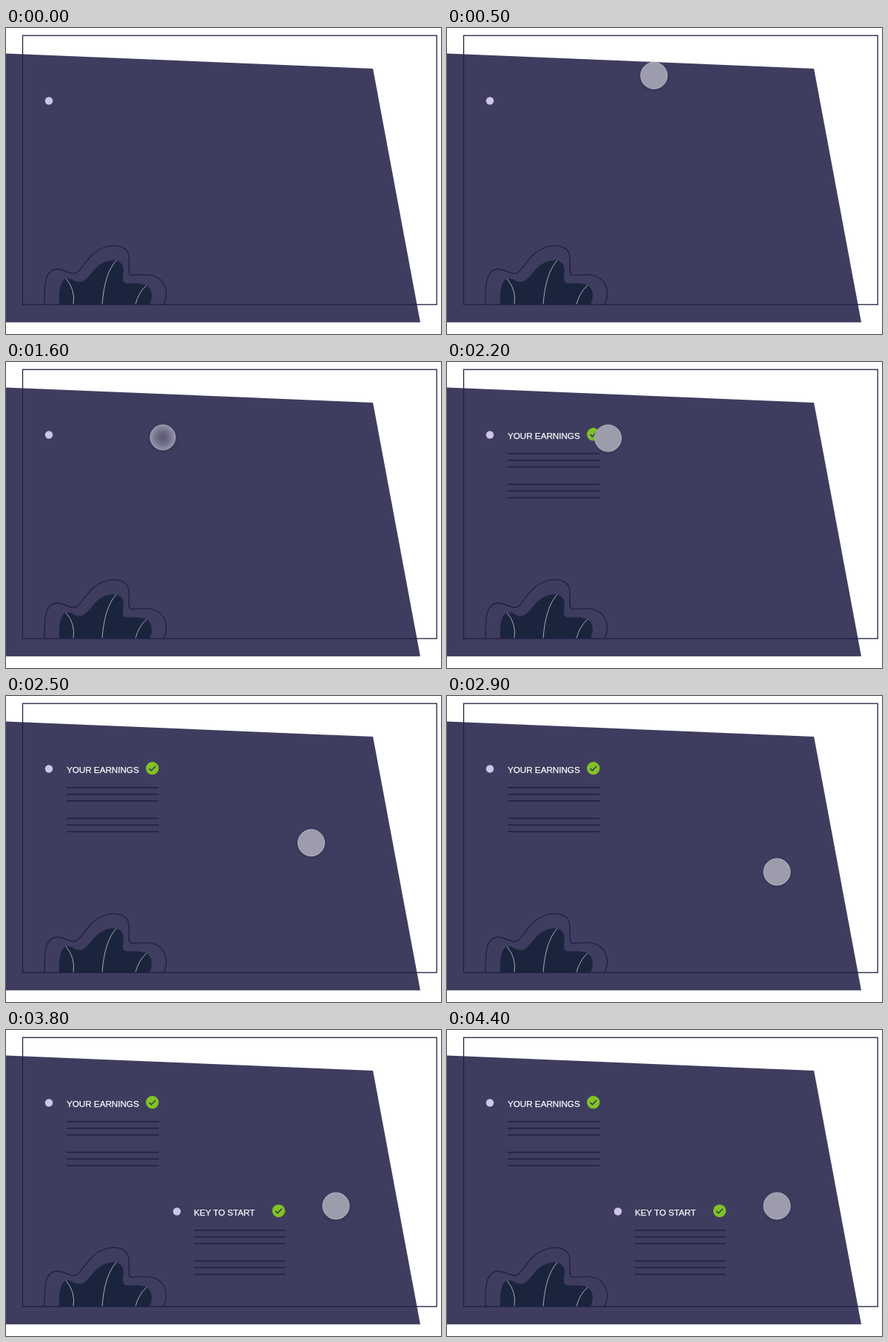
Write an HTML page that moves like this. It is 588 by 414 pixels and loops after 4600 ms.

```html
<!DOCTYPE html>
<html lang="en">
<head>
<meta charset="utf-8">
<title>Earnings steps</title>
<style>
  html, body { margin: 0; width: 100%; height: 100%; overflow: hidden; background: #fff; }
  svg { display: block; width: 588px; height: 414px; }
  text { font: 11.65px "Liberation Sans", Arial, sans-serif; fill: #fff; stroke: #fff; stroke-width: .25px; }
  .line { fill: none; stroke: #1f1e43; stroke-width: 1.3; }
  .vein { fill: none; stroke: #c9cad6; stroke-width: .8; }
  .dot { fill: #cec6e6; }
  #cursor { filter: drop-shadow(0 1px 2px rgba(22, 20, 52, .4)); }
</style>
</head>
<body>
<svg viewBox="0 0 588 414">
  <defs>
    <radialGradient id="hollow">
      <stop offset="0" stop-color="#56546f"/>
      <stop offset=".5" stop-color="#706e88"/>
      <stop offset="1" stop-color="#9492a6"/>
    </radialGradient>
    <g id="tick">
      <circle r="8.7" fill="#82c226"/>
      <path d="M-4.2 .3L-1.4 3.1L4.4 -2.9" fill="none" stroke="#2b3a54" stroke-width="1.5"/>
    </g>
  </defs>

  <path d="M0 34.5L496 55L560 398.3H0Z" fill="#3f3d5f"/>
  <path class="line" d="M52 374C52 345 53 330 66 326.5C78 324 88 337 97 330C108 319 114 303 134 296.5C150 291 165 297 166 309C167 320 164 333 169 334.5C176 335 190 331 202 336C217 343 220 360 213 374"/>
  <path d="M72 374C71 355 74 341 81 339C90 337 93 346 103 343C115 338 120 317 142 314.5C155 313 159 321 159 328C158 338 156 345 164 345.5C172 346 180 344 189 347.5C198 352 199 364 194 374Z" fill="#1b243d"/>
  <path class="vein" d="M81 339Q94 354 91 374M149 314.5Q133 332 130 374M190 348Q179 358 175 374"/>
  <rect class="line" x="22.5" y="10.2" width="559.7" height="364"/>

  <circle class="dot" cx="58" cy="98.5" r="5.2"/>
  <g id="earn" transform="translate(82 98)">
    <text y="5.6">YOUR EARNINGS</text>
    <use href="#tick" x="115.8" y="-.2"/>
    <path class="line"/>
  </g>
  <g id="start" transform="translate(254 245)">
    <circle class="dot" cx="-23" cy=".5" r="5.2"/>
    <text y="5.6">KEY TO START</text>
    <use href="#tick" x="114.5" y="-.4"/>
    <path class="line"/>
  </g>

  <g id="cursor">
    <circle id="ring" fill="url(#hollow)" stroke="#aaa8b9"/>
    <circle id="disc" fill="#9d9cad" stroke="#b9b8c5"/>
  </g>
</svg>
<script>
const LOOP = 4600, STEP = 100;
const ROWS = [26, 35, 44, 67.5, 76.5, 85.5];
const [earn, start, cursor, ring, disc] =
  ['earn', 'start', 'cursor', 'ring', 'disc'].map(id => document.getElementById(id));

const ramp = (t, a, b) => Math.min(1, Math.max(0, (t - a) / (b - a)));
const smooth = u => u * u * (3 - 2 * u);
const easeOut = u => u * (2 - u);
const mix = (a, b, u) => a + (b - a) * u;
const lerp = (p, q, u) => p.map((v, i) => mix(v, q[i], u));
const press = (t, down) => ramp(t, down, down + 200) * (1 - ramp(t, down + 300, down + 600));

const ENTRY = [321, 40], REST = [211.5, 104.7], CLICK = [212, 102], BEND = [370, 131], END = [446, 238];

function cursorAt(t) {
  if (t < 1000) return lerp(ENTRY, REST, smooth(ramp(t, 250, 850)));
  if (t < 2100) return lerp(REST, CLICK, ramp(t, 1000, 1300));
  const u = easeOut(ramp(t, 2195, 2745));
  return lerp(lerp(CLICK, BEND, u), lerp(BEND, END, u), u);
}

function showBlock(block, width, u) {
  block.setAttribute('opacity', u);
  block.querySelector('path').setAttribute('d', ROWS.map(y => `M0 ${y}h${width * u}`).join(''));
}

function render(t) {
  showBlock(earn, 124.5, ramp(t, 1700, 2200));
  showBlock(start, 123, ramp(t, 3100, 3600));

  const down = Math.max(press(t, 1400), press(t, 2900));
  cursor.setAttribute('transform', `translate(${cursorAt(t)})`);
  cursor.setAttribute('opacity', ramp(t, 250, 450));
  ring.setAttribute('opacity', down > 0 ? 1 : 0);
  disc.setAttribute('opacity', 1 - down);
  for (const c of [ring, disc]) c.setAttribute('r', 18 - down);
}

const begin = performance.now();
function tick() {
  const t = (performance.now() - begin) % LOOP;
  render(Math.floor(t / STEP) * STEP);
  requestAnimationFrame(tick);
}
tick();
</script>
</body>
</html>
```
